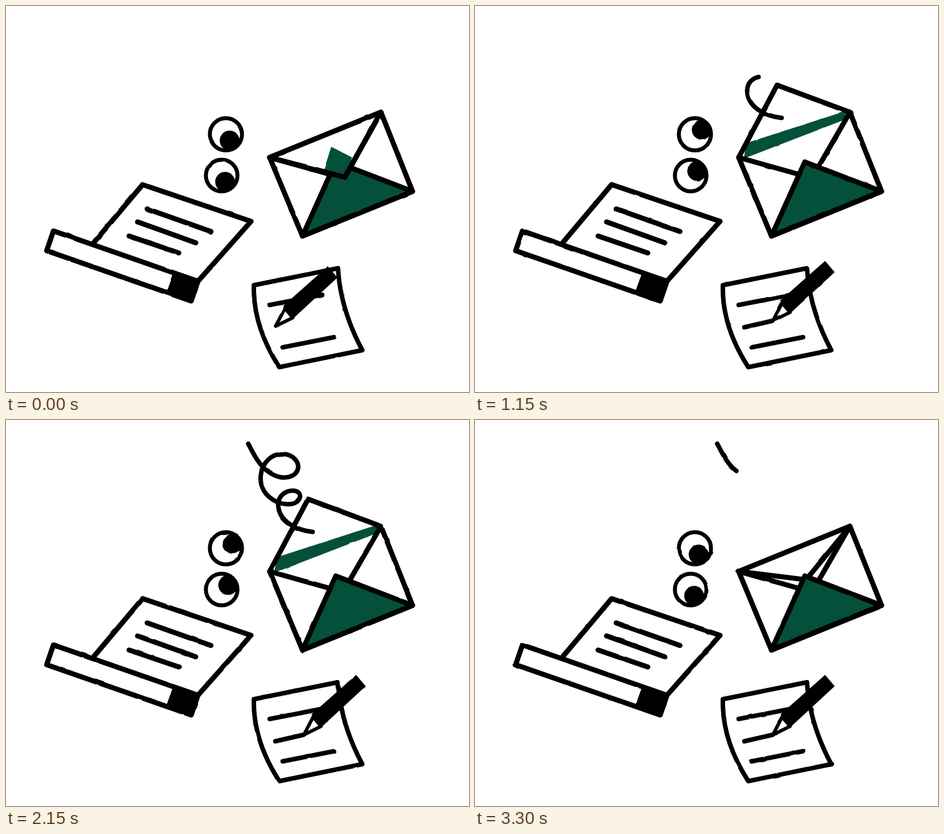
An HTML page that plays this animation: 820 px wide and 683 px high, repeating every 3.35 s.

```html
<!DOCTYPE html>
<html lang="en">
<head>
<meta charset="utf-8">
<title>Paperwork</title>
<style>
  html, body { margin: 0; width: 100%; height: 100%; overflow: hidden; background: #fff; }
  svg { display: block; width: 100%; height: 100%; }
  .ink { fill: none; stroke: #000; stroke-width: 9; stroke-linecap: round; stroke-linejoin: round; }
  .paper { fill: #fff; }
  .thin { stroke-width: 8; }
  .green { fill: #04503b; }
</style>
</head>
<body>
<svg viewBox="0 0 820 683">
  <filter id="boil" filterUnits="userSpaceOnUse" x="0" y="0" width="820" height="683" color-interpolation-filters="sRGB">
    <feTurbulence id="noise" type="fractalNoise" baseFrequency=".04" numOctaves="1" result="n"/>
    <feDisplacementMap in="SourceGraphic" in2="n" scale="2.4" xChannelSelector="R" yChannelSelector="G"/>
  </filter>
  <g class="ink" filter="url(#boil)">
    <!-- scroll -->
    <path class="paper" d="M156 418L242 316L434 381L340 487"/>
    <path d="M250 359L363 399M233 382L336 419M218 407L306 437"/>
    <path class="paper" d="M84 398L340 487L328 522L72 433Z"/>
    <path fill="#000" stroke="none" d="M296 472L343 487L329 523L284 505Z"/>

    <!-- eyes -->
    <g stroke-width="7">
      <circle class="paper" cx="389.5" cy="227" r="28.5"/>
      <circle class="paper" cx="382" cy="300" r="28"/>
    </g>
    <g id="pupils" fill="#000" stroke="none">
      <circle cx="396" cy="238" r="17.5"/>
      <circle cx="388" cy="311" r="17.5"/>
    </g>

    <!-- envelope -->
    <path id="stripe" class="green" stroke="none"/>
    <path d="M467 268L525 407L720 328L664 188M467 268L574 298M664 188L608 285"/>
    <path id="flap"/>
    <path class="green" d="M584 276L720 328L525 407Z"/>
    <g id="sealed">
      <path class="paper" d="M467 268L600 303L664 188Z"/>
      <path class="green" stroke="none" d="M576 249L613 268L600 303L562 293Z"/>
      <path d="M467 268L600 303L664 188"/>
    </g>

    <!-- note and pen -->
    <g class="thin">
      <path class="paper" d="M439 494L588 464Q592 536 631 609L484 639Q437 566 439 494Z"/>
      <path d="M467 529L560 511M490 604L581 586"/>
      <path id="written"/>
    </g>
    <g id="pen">
      <path fill="#000" stroke="none" d="M541 521L620 451L637 471L557 545Z"/>
      <path class="paper" stroke-width="6" d="M527.5 557L544 525.5L558 542Z"/>
    </g>

    <!-- flourishes -->
    <path id="crown" class="thin" pathLength="1" d="M198 268L160 198L215 223L229 136L263 216L297 186L294 243"/>
    <path id="curl" class="thin" pathLength="1" d="M543 198C515 195 483 180 482 150C482 133 496 125 508 125C520 125 524 135 518 142C510 152 490 150 478 144C460 135 450 120 451 100C453 74 472 59 491 60C508 61 520 74 517 87C514 98 500 104 485 101C468 97 455 85 446 72C439 62 434 51 429 42"/>
  </g>
</svg>
<script>
const LOOP = 3350, STEP = 50;
const HOLDS = [[0, 200], [1600, 1750], [2600, 2800], [2800, 3000]];

// Each track is a list of [time, value], linear between entries.
const tracks = {
  pen: [[167, 0], [911, 1]],
  look: [[700, 0], [950, 1], [2250, 1], [2500, 0]],
  flap: [[400, 0], [600, 1.27], [700, .97], [750, 1], [2950, 1], [3350, 0]],
  crownHead: [[150, 0], [400, 1]],
  crownTail: [[450, 0], [700, 1]],
  curlHead: [[1000, 0], [1600, 1]],
  curlTail: [[2950, 0], [3350, 1]]
};

const $ = id => document.getElementById(id);
const set = (id, name, value) => $(id).setAttribute(name, value);
const show = (id, on) => set(id, 'visibility', on ? 'visible' : 'hidden');

function at(name, t) {
  const keys = tracks[name];
  if (t <= keys[0][0]) return keys[0][1];
  for (let i = 1; i < keys.length; i++) {
    const [t0, a] = keys[i - 1], [t1, b] = keys[i];
    if (t <= t1) return a + (b - a) * (t - t0) / (t1 - t0);
  }
  return keys[keys.length - 1][1];
}

function trim(id, from, to) {
  show(id, to > from);
  set(id, 'stroke-dasharray', `${Math.max(to - from, 0)} 2`);
  set(id, 'stroke-dashoffset', -from);
}

function drawFlap(p) {
  const x = 600 - 65 * p ** .75, y = 303 - 163 * p;
  const above = y < 222;
  set('flap', 'd', `M467 268L${x} ${y}L664 188${above ? '' : 'Z'}`);
  set('flap', 'fill', above ? 'none' : '#fff');
  const near = (px, py, k) => `${px + (x - px) * k} ${py + (y - py) * k}`;
  set('stripe', 'd', `M${near(467, 268, .2)}L${near(664, 188, .05)}L663 198L476 270Z`);
  show('stripe', above);
  show('sealed', p === 0);
}

function quantize(ms) {
  const hold = HOLDS.find(([a, b]) => ms >= a && ms < b);
  return hold ? hold[0] : Math.floor(ms / STEP) * STEP;
}

function draw(t) {
  set('noise', 'seed', 1 + t / STEP);

  const pen = at('pen', t), dx = 50 * (pen - 1), dy = -9.5 * (pen - 1);
  set('pen', 'transform', `translate(${dx} ${dy})`);
  set('written', 'd', `M477 568.5L${527 + dx} ${557 + dy}`);
  show('written', pen > 0);

  const look = at('look', t);
  set('pupils', 'transform', `translate(${5.5 * look} ${-19 * look})`);

  drawFlap(at('flap', t));
  trim('crown', at('crownTail', t), at('crownHead', t));
  trim('curl', at('curlTail', t), at('curlHead', t));
}

const start = performance.now();
let last = -1;
function tick() {
  const t = quantize((performance.now() - start) % LOOP);
  if (t !== last) draw(last = t);
  requestAnimationFrame(tick);
}
tick();
</script>
</body>
</html>
```
